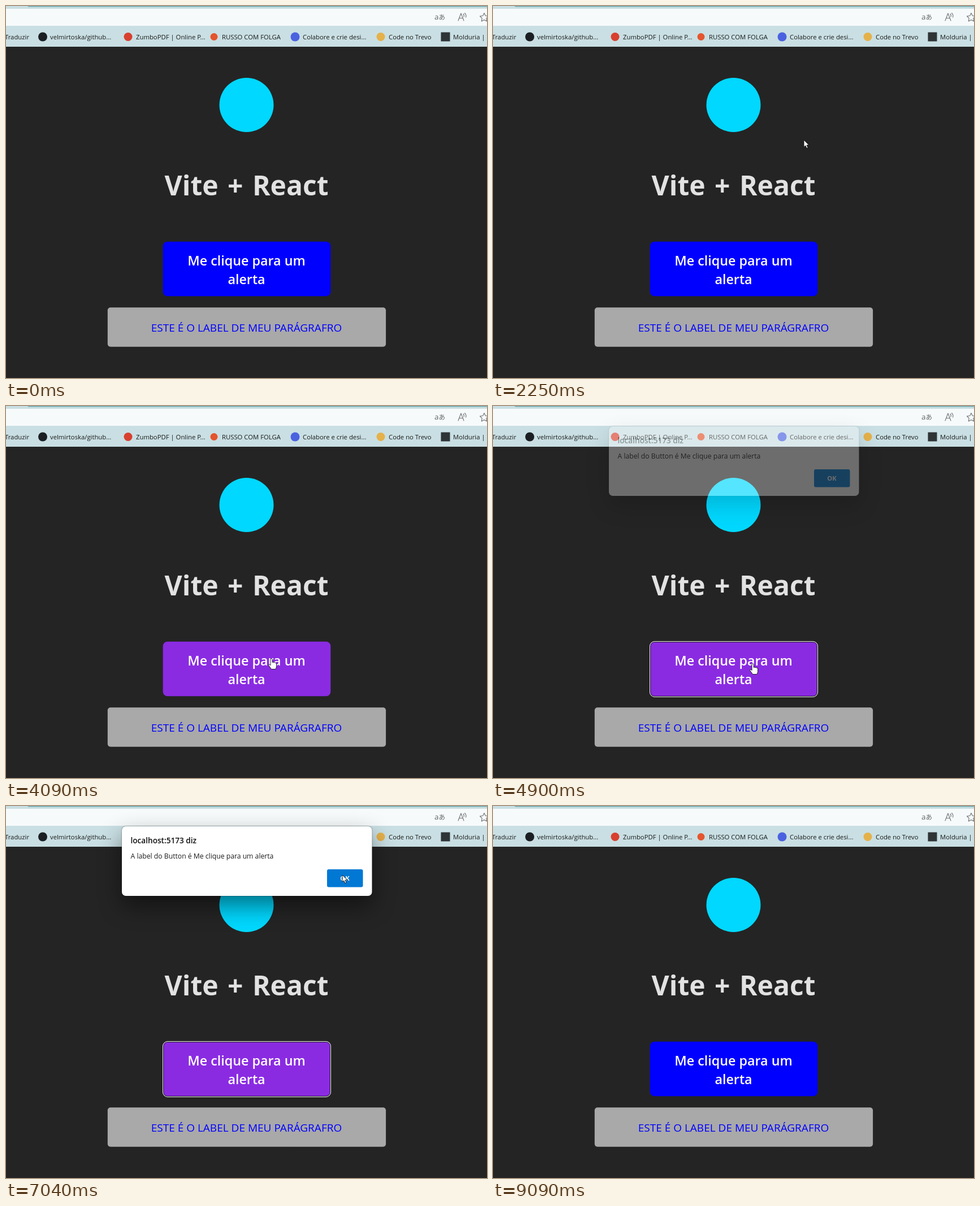
Write an HTML page that moves like this. It is 851 px wide and 658 px high and loops after 9.21 s.

```html
<!DOCTYPE html>
<html lang="pt-BR">
<head>
<meta charset="utf-8">
<title>Vite + React</title>
<style>
  html, body { margin: 0; width: 100%; height: 100%; overflow: hidden; background: #242424; }
  svg { display: block; font-family: "Open Sans", "Noto Sans", sans-serif; }
  .mid { text-anchor: middle; }
  .semi { font-weight: 600; }
  #title { word-spacing: 4px; }
  #panel { filter: drop-shadow(0 0 1px #0008) drop-shadow(0 18px 20px #0007); }
  .cursor { fill: #fff; stroke: #111; stroke-width: .9; stroke-linejoin: round; }
  .icon { fill: none; stroke: #6a6f72; stroke-width: 1.1; stroke-linecap: round; stroke-linejoin: round; }
</style>
</head>
<body>
<svg width="851" height="658" viewBox="0 0 851 658">
  <rect width="851" height="658" fill="#242424"/>

  <!-- Browser bars -->
  <rect width="851" height="72" fill="#c9dfe3"/>
  <path d="M38 0H851V1.5H41Q39 1.5 38 0" fill="#6fa9b1"/>
  <rect y="5" width="851" height="30" fill="#f7fafb"/>
  <text x="758" y="24" font-size="13.5" fill="#62676a">a<tspan font-family="Noto Sans CJK JP, Noto Sans CJK, sans-serif" font-size="11.5">あ</tspan></text>
  <g class="icon">
    <path d="M800 26l5-13 5 13M802 21.5h6.2M809 14q2 2 1 5M811.5 12.5q3.5 3 2 7.5"/>
    <path d="M846 12.5l2.3 4.7 5.2.8-3.7 3.7.9 5.2-4.7-2.5-4.7 2.5.9-5.2-3.7-3.7 5.2-.8z"/>
  </g>
  <g id="bookmarks" font-size="11.3" fill="#1b1b1b">
    <text x="41" y="58.5" text-anchor="end">Traduzir</text>
  </g>

  <!-- Page -->
  <circle cx="425.5" cy="175" r="48" fill="#00d8ff"/>
  <text id="title" class="mid" x="425.5" y="334.5" font-size="48" font-weight="700" fill="#e2e2e2">Vite + React</text>
  <rect id="button" x="277.7" y="416.7" width="296.6" height="96.6" rx="8"/>
  <g id="ring" fill="none">
    <rect x="278.5" y="417.5" width="295" height="96" rx="7.5" stroke="#101010"/>
    <rect x="277.5" y="416.5" width="297" height="98" rx="8.5" stroke="#fff"/>
  </g>
  <g class="mid semi" font-size="23.3" fill="#fff">
    <text x="425.5" y="458.5">Me clique para um</text>
    <text x="425.5" y="491.5">alerta</text>
  </g>
  <rect x="179.8" y="533.2" width="492.3" height="69.6" rx="5" fill="#a9a9a9"/>
  <text class="mid" x="425.5" y="576" font-size="19" fill="#00f">ESTE É O LABEL DE MEU PARÁGRAFRO</text>

  <g id="dialog">
    <rect id="panel" x="205" y="36" width="442.5" height="123" rx="7" fill="#fff"/>
    <text class="semi" x="220.5" y="65.5" font-size="13.6" fill="#111">localhost:5173 diz</text>
    <text x="220.5" y="93" font-size="12.2" fill="#1b1b1b">A label do Button é Me clique para um alerta</text>
    <rect id="ok" x="568" y="112" width="63.5" height="31.5" rx="3"/>
    <text class="mid" x="599.5" y="132" font-size="11.3" font-weight="700" fill="#fff">OK</text>
  </g>

  <path id="arrow" class="cursor" d="M0 0V12.5L2.8 9.9 5 14.6 7.2 13.6 5 9H9z"/>
  <path id="hand" class="cursor" d="M-2 1.5Q-2-.3-.4-.3T1.2 1.5V6.5Q2.5 5.3 4 6.7 5.5 5.7 6.5 7.3 8.5 6.7 8.5 9V13.5Q8.5 16 6.8 18.5H-.5Q-2.5 15.5-5.5 11.5-5.5 9.5-3.5 10.2L-2 11.7z"/>
</svg>
<script>
const LOOP = 9210, STEP = 67;
const $ = id => document.getElementById(id);

// [icon centre, text start, colour, label, radius]; radius 0 means a square
const bookmarks = [
  [65, 78, '#1b1f23', 'velmirtoska/github...', 8],
  [216, 230, '#d8402f', 'ZumboPDF | Online P...', 7.5],
  [368, 382, '#e4552d', 'RUSSO COM FOLGA', 6.5],
  [511.5, 525, '#4a62e0', 'Colabore e crie desi...', 8],
  [663, 677, '#e5b14a', 'Code no Trevo', 7.5],
  [777.5, 791, '#2f3437', 'Molduria |', 0],
];
$('bookmarks').innerHTML += bookmarks.map(([cx, x, color, label, r]) =>
  (r ? `<circle cx="${cx}" cy="54.5" r="${r}" fill="${color}"/>`
     : `<rect x="${cx - 8}" y="46.5" width="16" height="16" fill="${color}"/>`) +
  `<text x="${x}" y="58.5">${label}</text>`).join('');

// Pointer path: [time, x, y]
const path = [
  [890, 806, 652], [1760, 719, 486], [2250, 550, 237], [2713, 550, 237],
  [2920, 530, 251], [3300, 440, 200], [3520, 380, 165], [3680, 420, 131],
  [4090, 470, 447], [4290, 460, 456], [5503, 460, 456], [5570, 474, 438],
  [6440, 594, 120], [6510, 595, 122], [7110, 595, 122], [7650, 680, 135],
  [7850, 805, 501], [8053, 805, 501], [8590, 812, 660],
];

function pointerAt(t) {
  const next = path.findIndex(key => key[0] > t);
  if (next < 1) return null;
  const [t0, x0, y0] = path[next - 1], [t1, x1, y1] = path[next];
  const steps = Math.max(1, Math.round((t1 - t0) / STEP));
  const u = Math.floor((t - t0) / (t1 - t0) * steps) / steps;
  return [x0 + (x1 - x0) * u, y0 + (y1 - y0) * u];
}

const within = ([x, y], left, top, right, bottom) =>
  x >= left && x <= right && y >= top && y <= bottom;
const fade = (t, start) => Math.min(1, Math.max(0, (Math.floor((t - start) / 70) + 1) / 3));

function placeCursor(id, pos, visible) {
  $(id).style.display = visible ? '' : 'none';
  if (visible) $(id).setAttribute('transform', `translate(${pos})`);
}

function draw(t) {
  const pos = pointerAt(t);
  const overButton = pos && within(pos, 278, 417, 574, 514);
  const overLogo = pos && t < 4550 && within(pos, 350, 104, 501, 247);
  const modal = t >= 4900 && t < 7180;

  $('button').setAttribute('fill', overButton || modal ? '#8a2be2' : '#00f');
  $('ring').style.display = t >= 4550 && t < 9090 ? '' : 'none';
  $('dialog').style.opacity = fade(t, 4900) * (1 - fade(t, 7110));
  $('ok').setAttribute('fill', t >= 6840 && t < 7040 ? '#0a70c4' : '#0078d4');
  placeCursor('arrow', pos, pos && !overButton && !overLogo);
  placeCursor('hand', pos, overButton || overLogo);
}

const start = performance.now();
function tick() {
  draw((performance.now() - start) % LOOP);
  requestAnimationFrame(tick);
}
tick();
</script>
</body>
</html>
```
